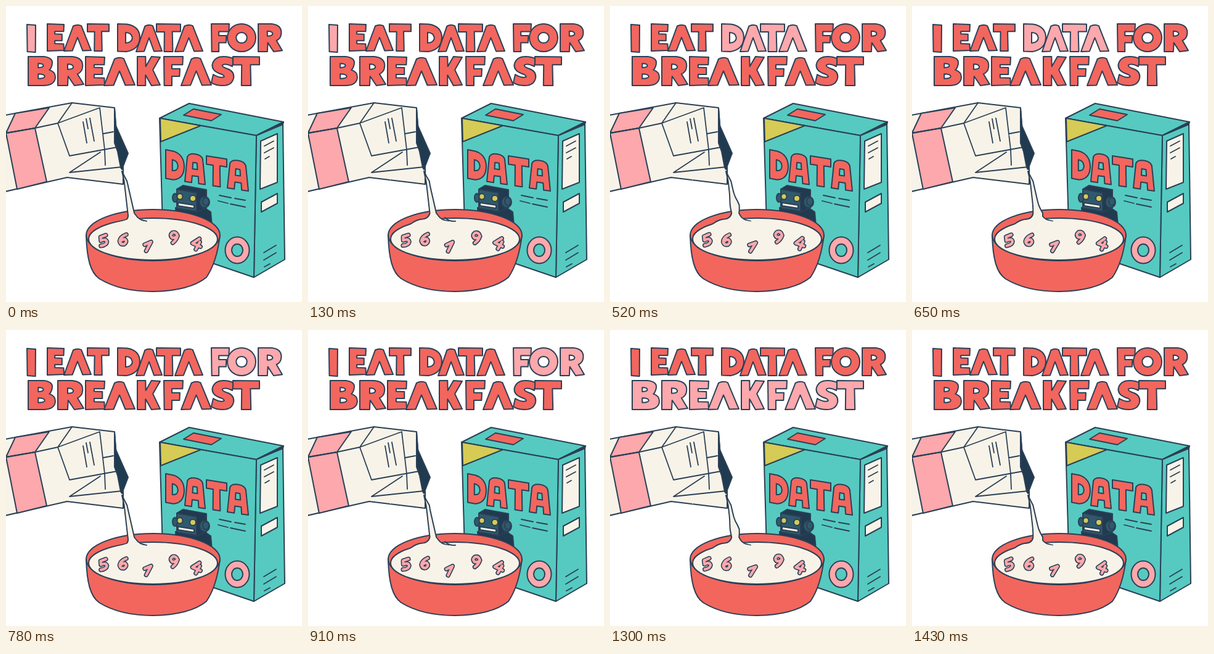
Recreate the animation shown at these times as an HTML page. Size 480 by 480 pixels, loop 1560 ms.

```html
<!DOCTYPE html>
<html lang="en">
<head>
<meta charset="utf-8">
<title>I eat data for breakfast</title>
<style>
html, body { margin: 0; width: 100%; height: 100%; overflow: hidden; background: #fff; }
svg { display: block; width: 100vw; height: 100vh; }
path, ellipse { stroke: #2b4056; stroke-width: 2; stroke-linejoin: round; stroke-linecap: round; fill-rule: evenodd; }
.red { fill: #f2665e; }
.pink { fill: #fca8ac; }
.cream { fill: #f8f3e8; }
.teal { fill: #56cac0; }
.yellow { fill: #d6cb55; }
.navy { fill: #203a50; }
.steel { fill: #2f5a6e; }
.line { fill: none; stroke-width: 1.8; }
.bare { stroke: none; }
.ink { fill: none; stroke-width: 7.4; }
.core { fill: none; stroke: #fca8ac; stroke-width: 4.2; }
</style>
</head>
<body>
<svg viewBox="0 0 480 480" role="img" aria-label="I eat data for breakfast">
  <filter id="rough" filterUnits="userSpaceOnUse" x="0" y="0" width="480" height="480" color-interpolation-filters="sRGB">
    <feTurbulence id="noise" type="fractalNoise" baseFrequency=".25" numOctaves="1" result="n"/>
    <feDisplacementMap in="SourceGraphic" in2="n" scale="1.5" xChannelSelector="R" yChannelSelector="G"/>
  </filter>
  <g filter="url(#rough)">
    <g id="title"></g>

    <g id="box">
      <path class="teal" d="M249 182L297 158L450 188L406 210Z"/>
      <path class="teal" d="M406 210L449 191L452 411L402 440Z"/>
      <path class="teal" d="M249 182L406 210L402 440L255 390Z"/>
      <path class="navy" d="M408 209L450 188L449 192Z"/>
      <path class="red" d="M288 177L304 167L349 176L333 186Z"/>
      <path class="yellow" d="M250 182L316 194L251 220Z"/>
      <path class="cream" d="M413 219L440 207L440 286L412 297Z"/>
      <path class="cream" d="M414 318L440 304L440 320L414 334Z"/>
      <path class="line" d="M419 227L434 219M419 238L434 230M420 248L427 244M418 400L438 388M418 412L438 400M419 423L428 418"/>
      <path class="line" d="M346 307L365 311M371 312L388 315M344 316L360 320M364 321L388 326"/>
      <ellipse class="pink" cx="375" cy="396" rx="19.5" ry="21.5"/>
      <ellipse class="teal" cx="375" cy="396" rx="9" ry="10"/>
      <g id="label"></g>
    </g>

    <g id="robot">
      <path class="navy" d="M275 327L319 325L332 334L334 356L276 348Z"/>
      <path class="navy" d="M277 297L287 291L325 298L325 327L309 334L277 328Z"/>
      <path class="steel" d="M277 297L309 303L309 333L277 328Z"/>
      <ellipse class="steel" cx="274" cy="311" rx="4" ry="7"/>
      <ellipse class="steel" cx="322" cy="318" rx="8" ry="9"/>
      <ellipse class="steel" cx="324" cy="317" rx="5" ry="6.5"/>
      <ellipse class="yellow" cx="282" cy="309" rx="4.5" ry="4.8"/>
      <ellipse class="yellow" cx="303" cy="312" rx="5" ry="5"/>
      <path class="cream" d="M279 319L305 323L305 328L279 324Z"/>
    </g>

    <g id="carton">
      <path class="cream" d="M-6 178L107 157L176 165L181 230L190 262L190 289L99 278L-6 302Z"/>
      <path class="pink" d="M15 174L70 165L47 198L0 206Z"/>
      <path class="pink" d="M0 206L47 198L66 285L18 297Z"/>
      <path class="line" d="M-4 207L47 198L84 190L107 157M84 190L152 165L160 233L161 258M84 190L103 243L180 229M103 270L153 237M103 270L188 261M158 207L174 204"/>
      <path class="line" d="M125 188L131 222M130 183L133 199M136 182L143 219"/>
      <path class="navy" d="M176 166L178 194L198 239L188 265L186 262L181 236L176 222Z"/>
    </g>

    <g id="bowl">
      <path class="red" d="M130 371C131 410 137 432 151 442Q185 463 238 463Q298 462 325 440Q342 415 347 371Z"/>
      <ellipse class="red" cx="238.5" cy="371.5" rx="108.5" ry="41.5"/>
      <ellipse class="cream" cx="238.5" cy="378" rx="104.5" ry="34"/>
      <path id="stream" class="cream"/>
      <path id="blend" class="cream bare"/>
      <path id="ripple" class="line"/>
      <g id="digits"></g>
    </g>
  </g>
</svg>
<script>
const $ = id => document.getElementById(id);

// Letters in a 100 x 100 cell
const glyphs = {
  I: "M0 0L100 2L98 100L4 98Z",
  E: "M0 0L100 2L98 28L45 28L45 37L88 38L88 62L45 62L45 73L98 74L100 98L0 100Z",
  A: "M34 8Q50 0 64 7L100 98L69 99L50 50L31 99L0 100Z",
  T: "M0 0L100 1L100 28L66 28L68 100L32 100L33 29L0 29Z",
  D: "M0 0L42 1Q100 8 100 50Q98 92 40 100L0 99Z M36 31L36 69Q66 67 66 50Q64 32 36 31Z",
  F: "M0 0L100 0L98 28L42 28L42 42L84 42L82 68L42 68L42 100L2 100Z",
  O: "M50 0C78 0 100 22 100 50C100 78 78 100 50 100C22 100 0 78 0 50C0 22 22 0 50 0Z M50 31C62 31 69 40 69 50C69 60 62 69 50 69C38 69 31 60 31 50C31 40 38 31 50 31Z",
  R: "M0 0L56 0Q98 4 96 34Q94 54 76 60L100 96L64 100L40 68L38 100L0 100Z M38 26L38 44Q60 44 60 35Q58 26 38 26Z",
  B: "M0 0L58 0Q94 4 88 28Q84 42 78 46Q100 52 100 72Q98 100 56 100L0 100Z M37 24L37 38Q56 38 56 31Q55 24 37 24Z M37 60L37 76Q61 76 61 68Q60 60 37 60Z",
  K: "M0 0L36 0L37 34L62 0L100 2L68 46L100 98L62 100L36 64L36 100L0 100Z",
  S: "M98 8L92 34Q60 22 48 30Q46 36 70 42Q100 50 98 72Q92 100 50 100Q20 100 0 90L8 62Q40 76 56 70Q58 64 34 58Q2 48 4 28Q12 0 54 0Q80 0 98 8Z",
  a: "M12 14Q20 0 50 0Q82 0 88 14L100 100L68 100L66 76L36 76L33 100L0 100Z M40 30L60 30L62 52L38 52Z"
};

function letter(ch, x, y, w, h, slope = 0) {
  const d = glyphs[ch].replace(/(\d+) (\d+)/g, (_, a, b) => {
    const dx = a * w / 100;
    return `${(x + dx).toFixed(1)} ${(y + b * h / 100 + slope * dx).toFixed(1)}`;
  });
  return `<path d="${d}"/>`;
}

// Each word: letters, top, height, then left and right edge of each letter
const words = [
  ["I", 30, 45, [34, 48]],
  ["EAT", 29, 44, [67, 94, 94, 138, 132, 167]],
  ["DATA", 29, 45, [181, 217, 211, 253, 244, 283, 274, 319]],
  ["FOR", 29, 45, [333, 362, 359, 405, 409, 448]],
  ["BREAKFAST", 82, 47, [36, 80, 84, 126, 129, 160, 159, 209, 213, 250, 256, 287, 284, 333, 333, 370, 368, 411]]
];
$("title").innerHTML = words.map(([text, y, h, e]) => "<g>" + [...text].map((ch, i) =>
  letter(ch, e[2 * i], y, e[2 * i + 1] - e[2 * i], h)).join("") + "</g>").join("");
const wordNodes = [...$("title").children];

$("label").setAttribute("class", "red");
$("label").innerHTML = [["D", 259, 30], ["a", 290, 33], ["T", 325, 33], ["a", 359, 34]]
  .map(([ch, x, w]) => letter(ch, x, 233 + .15 * (x - 259), w, 47, .15)).join("");

// Floating digits: path, x, y, tilt
const digits = [
  ["M6-8L-3-7L-4-1Q5-3 5 3Q3 8-6 7", 158, 380, -14],
  ["M4-9Q-5-4-5 3Q-3 9 3 7Q8 2 3-1Q-2-1-4 4", 189, 379, 6],
  ["M-5-2L5-7L-2 8", 230, 390, 4],
  ["M5-4Q1-10-4-7Q-8-2-3 1Q3 1 5-4Q5 3 0 9", 273, 375, 16],
  ["M2-9L-7 1L7 3M4-4L1 9", 309, 385, 14]
];
$("digits").innerHTML = digits.map(([d]) =>
  `<g><path class="ink" d="${d}"/><path class="core" d="${d}"/></g>`).join("");
const digitNodes = [...$("digits").children];

// A swelling of milk slides down the stream
const bulgeY = [250, 268, 293, 305, 323, 340];
const ripples = ["", "M222 343Q229 350 239 349", "M229 351Q236 347 243 351", "M241 350L246 352", "", ""];

function pour(pose) {
  const bump = y => 4.5 * Math.exp(-(((y - bulgeY[pose]) / 11) ** 2));
  const left = [], right = [];
  for (let y = 284; y <= 336; y += 6.5) {
    const u = (y - 270) / 70;
    left.push(`${190 + 8 * u - .3 * bump(y)} ${y}`);
    right.unshift(`${193 + 16 * u + bump(y)} ${y}`);
  }
  const foot = pose
    ? "Q195 346 182 346Q173 348 166 354"
    : "Q199 342 196 346L188 349";
  $("stream").setAttribute("d",
    `M188 268L${left.join("L")}${foot}L190 362L222 360L228 349Q216 347 212 341L${right.join("L")}L192 276Z`);
  $("blend").setAttribute("d", pose
    ? "M165 355L183 347L198 346L215 347L232 350L226 366L168 366Z"
    : "M185 350L198 346L215 348L230 350L224 364L184 364Z");
  $("ripple").setAttribute("d", ripples[pose]);
}

const step = 130, count = 12;
let shown = -1;

function draw(now) {
  const i = Math.floor(now / step) % count;
  if (i !== shown) {
    shown = i;
    const lit = i === 11 ? -1 : Math.min(4, i >> 1);
    wordNodes.forEach((g, k) => g.setAttribute("class", k === lit ? "pink" : "red"));
    pour(i % 6);
    digitNodes.forEach((g, k) => {
      const [, x, y, tilt] = digits[k], a = i * Math.PI / 3 + k * 1.7;
      g.setAttribute("transform",
        `translate(${x + .7 * Math.sin(a)} ${y + .7 * Math.cos(a)}) rotate(${tilt + 3 * Math.sin(a)})`);
    });
    $("noise").setAttribute("seed", 1 + i % 3);
  }
  requestAnimationFrame(t => draw(Math.max(0, t - start)));
}

const start = performance.now();
draw(0);
</script>
</body>
</html>
```
